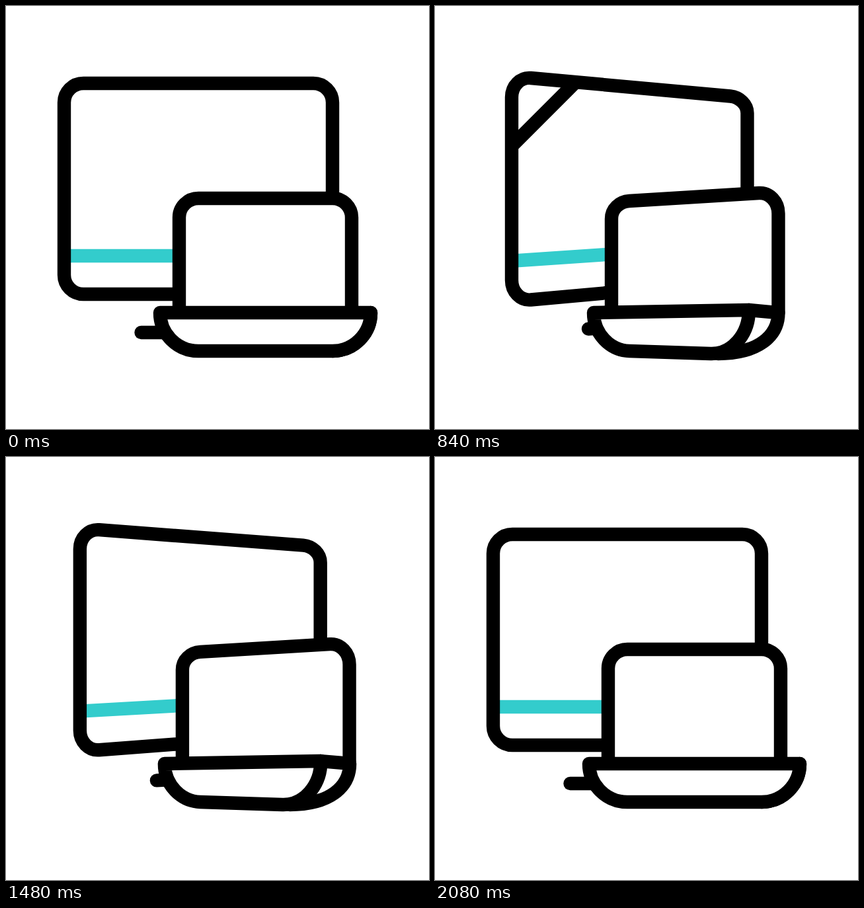
Write an HTML page that moves like this. It is 640 px wide and 640 px high and loops after 2560 ms.

```html
<!DOCTYPE html>
<html lang="en">
<head>
<meta charset="utf-8">
<title>Monitor and laptop</title>
<style>
  html, body { margin: 0; width: 100%; height: 100%; overflow: hidden; background: #fff; }
  svg { display: block; width: 100%; height: 100%; }
  path { fill: none; stroke: #000; stroke-width: 20.4; stroke-linecap: round; stroke-linejoin: round; }
  #bar { stroke: #3cc; stroke-linecap: butt; }
  .solid { fill: #fff; }
</style>
</head>
<body>
<svg viewBox="0 0 640 640">
  <defs>
    <clipPath id="monitorClip"><use href="#monitor"/></clipPath>
    <clipPath id="screenClip"><use href="#screen"/></clipPath>
  </defs>
  <path id="bar"/>
  <g clip-path="url(#monitorClip)"><path class="shine"/></g>
  <path id="monitor"/>
  <path id="stand"/>
  <path id="screen" class="solid"/>
  <g clip-path="url(#screenClip)"><path class="shine"/></g>
  <path id="side" class="solid"/>
  <path id="base" class="solid"/>
</svg>
<script>
const LOOP = 2560, STEP = 40, TURN = 640;

// Each shape: facing forward, then turned away
const monitorShapes = {
  monitor: [
    'M88 146C88 130 101 117 117 117L465 117C481 117 494 130 494 146L494 407C494 423 481 436 465 436L117 436C101 436 88 423 88 407Z',
    'M116 138C116 121 129 107.5 145 109L447 136.5C461 138 472.5 149 472.5 162L472.5 392C472.5 405 461 415.5 447 417L145 444.5C129 446 116 432 116 415Z'
  ],
  bar: ['M88 378L262 378', 'M116 385.7L267 375.5'],
  stand: ['M204.5 494L262 494', 'M232 488.5L267 486']
};
const laptopShapes = {
  screen: [
    'M262 464L262 320C262 304 275 291 291 291L494 291C510 291 523 304 523 320L523 464',
    'M267 464L267 322C267 307 279 296 294 295L490 283C506 282 519.5 296 519.5 314L519.5 464'
  ],
  base: [
    'M233 464L552 464C552 496 526 522 494 522L291 522C259 522 233 496 233 464Z',
    'M240 464L475 460C475 497 449 527 417 526L294 522C264 521 240 495 240 464Z'
  ],
  side: [
    'M552 464L552 464C552 496 526 522 494 522',
    'M475 460L519.5 464C519.5 500 488 526 428 526'
  ]
};

function ease(x) {
  if (x <= 0) return 0;
  if (x >= 1) return 1;
  // cubic-bezier(.58, 0, .42, 1), solved by bisection
  let lo = 0, hi = 1, s;
  for (let i = 0; i < 24; i++) {
    s = (lo + hi) / 2;
    const at = 1.74 * s * (1 - s) ** 2 + 1.26 * s * s * (1 - s) + s ** 3;
    if (at < x) lo = s; else hi = s;
  }
  return s * s * (3 - 2 * s);
}

const turn = (t, out, back) => ease((t - out) / TURN) - ease((t - back) / TURN);

function morph([from, to], p) {
  const ends = to.match(/[\d.]+/g);
  let i = 0;
  return from.replace(/[\d.]+/g, n => (+n + (ends[i++] - n) * p).toFixed(2));
}

function pose(shapes, p) {
  for (const id in shapes)
    document.getElementById(id).setAttribute('d', morph(shapes[id], p));
}

const shines = document.querySelectorAll('.shine');

function draw() {
  const t = Math.floor(performance.now() % LOOP / STEP) * STEP;
  pose(monitorShapes, turn(t, 0, 1280));
  pose(laptopShapes, turn(t, 120, 1400));
  const x = 328 + (t - 840) * 7 / 6;
  for (const s of shines) s.setAttribute('d', `M${x} 0L${x - 640} 640`);
  requestAnimationFrame(draw);
}
draw();
</script>
</body>
</html>
```
